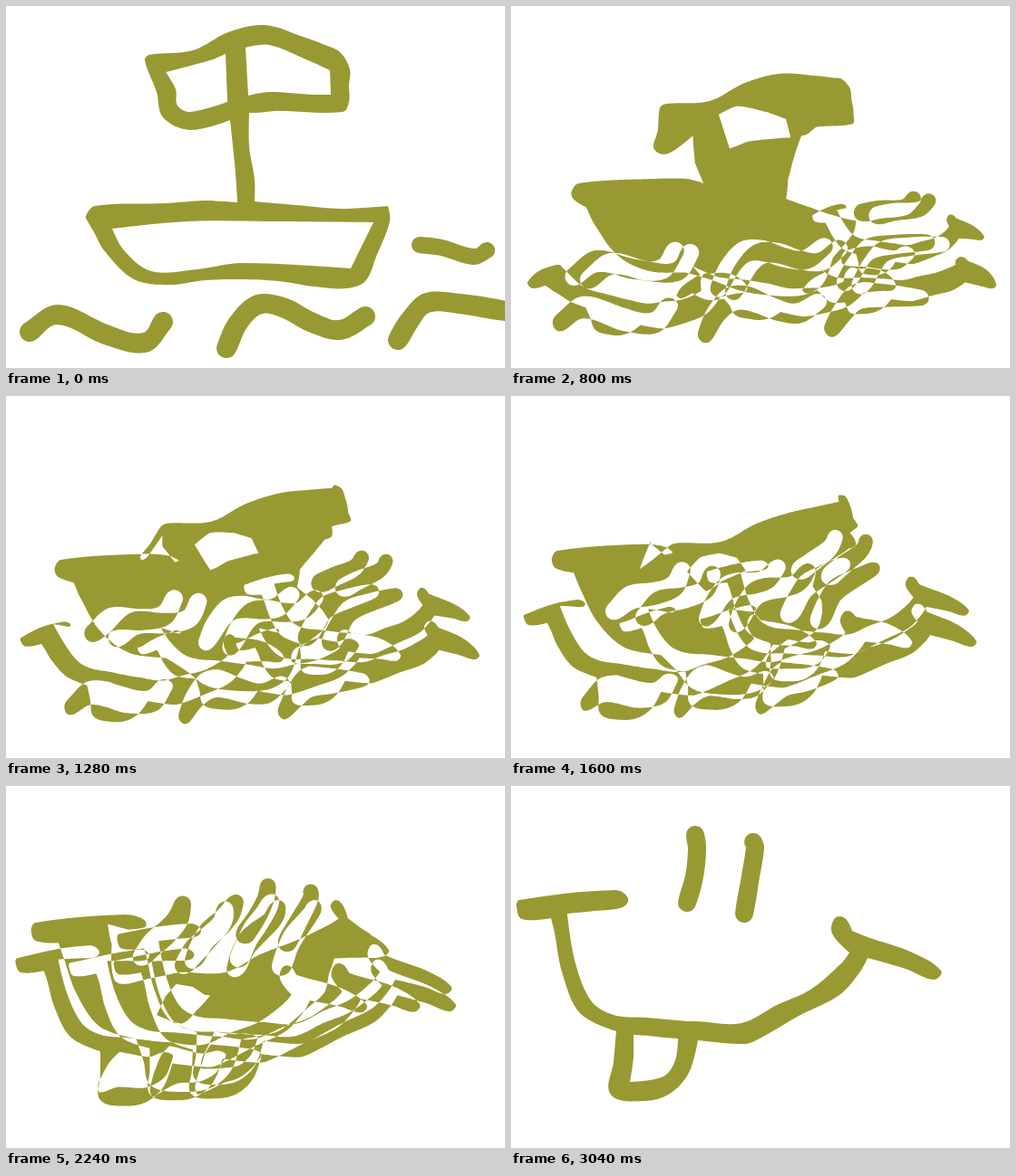
Animation, 550 px wide and 400 px high, one loop 3.2 s. Source, as an HTML page with a canvas:

```html
<!DOCTYPE html>
<html lang="en">
<head>
<meta charset="utf-8">
<title>Boat to smile</title>
<style>
html, body { margin: 0; width: 100%; height: 100%; overflow: hidden; background: #fff; }
canvas { display: block; }
</style>
</head>
<body>
<canvas id="stage" width="550" height="400"></canvas>
<script>
const INK = '#999933', STEP = 160, LAST = 19;

// Key points run clockwise; "!" marks a sharp corner.
// Boat and smile, and sail and tongue, match point by point.
const boat = outline(`88,232 98,221 175,218 218,215 240,216 255,217! 253,185 247,126! 203,137
  173,123 166,95 153,60 158,54 206,49 245,29 285,21 330,35 349,42 368,51 379,70 378,88
  378,106 371,117 300,116 276,118 268,118! 268,155 274,192 274,216! 320,220 370,224 421,221!
  423,238 408,277 396,304 375,312 340,310 300,304 260,302 220,303 180,308 141,302 108,270
  97,250 90,238`);
const smile = outline(`6,133 9,126 115,115 129,124 123,134 92,138 62,141! 70,192 88,237
  113,253 150,256 195,260 205,260 254,262 293,242 330,225 364,196 373,184! 354,163 357,146
  368,146 376,160! 393,167 440,183 474,204 466,214 435,202 393,190! 385,205 362,231 319,253
  266,283 250,285 206,281! 196,317 175,340 147,348 110,341 113,305 116,271! 76,251 56,205
  48,162 44,146! 12,147`);
const sail = outline('264,46! 290,43 335,61 357,71! 358,98! 340,98 290,95 267,99!');
const tongue = outline('131,327! 135,300 135,275! 152,276 169,278 184,279! 181,303 168,321');
const flag = outline('176,73! 225,60 242,53! 244,106! 203,117 189,110 187,92');
const hull = outline(`117,246! 200,238 300,238 405,239! 380,290! 260,284 210,291 160,293
  130,270`);

const waves = [
  stroke(11, '26,360 57,341 110,363 153,372 173,349'),
  stroke(11, '243,378 256,350 278,330 305,333 338,350 368,358 396,343'),
  stroke(11, '432,369 446,346 464,328 500,329 550,337'),
  stroke(9, '456,264 480,267 516,277 530,270')
];
const eyes = [
  stroke(10, '194,129 202,100 205,70 203,54'),
  stroke(10, '257,141 264,100 269,68 267,62')
];

function outline(text) {
  return text.trim().split(/\s+/).map(p => [...p.split(',').map(parseFloat), p.endsWith('!')]);
}

// Outline of a round-ended brush stroke; tip is the index of its far end
function stroke(r, text) {
  const mid = outline(text), n = mid.length;
  const spot = (p, a) => [p[0] + r * Math.cos(a), p[1] + r * Math.sin(a)];
  const angle = (p, q) => Math.atan2(q[1] - p[1], q[0] - p[0]);
  const cap = (p, a) => [-2, -1, 0, 1, 2].map(k => spot(p, a + k * Math.PI / 4));
  const side = turn => mid.slice(1, -1).map((p, i) =>
    spot(p, angle(mid[i], mid[i + 2]) + turn * Math.PI / 2));
  return {
    pts: [...cap(mid[0], angle(mid[1], mid[0])), ...side(-1),
      ...cap(mid[n - 1], angle(mid[n - 2], mid[n - 1])), ...side(1).reverse()],
    tip: n + 6
  };
}

function dist(a, b) { return Math.hypot(b[0] - a[0], b[1] - a[1]); }

// Smooth polyline along a closed outline, from point i up to point j (wrapping)
function curve(pts, i, j) {
  const n = pts.length, at = k => pts[(k + n) % n], out = [at(i)];
  const slope = k => {
    if (at(k)[2]) return [0, 0];
    const a = at(k - 1), b = at(k + 1), d = dist(a, b) || 1;
    return [(b[0] - a[0]) / d, (b[1] - a[1]) / d];
  };
  if (j <= i) j += n;
  for (let k = i; k < j; k++) {
    const p = at(k), q = at(k + 1), u = slope(k), v = slope(k + 1), h = dist(p, q) / 3;
    for (let s = 1; s <= 8; s++) {
      const t = s / 8, r = 1 - t;
      out.push([0, 1].map(c => r * r * r * p[c] + 3 * r * r * t * (p[c] + u[c] * h)
        + 3 * r * t * t * (q[c] - v[c] * h) + t * t * t * q[c]));
    }
  }
  return out;
}

function length(line) {
  return line.reduce((sum, p, i) => i ? sum + dist(line[i - 1], p) : 0, 0);
}

// n points at equal distances, without the end point
function resample(line, n) {
  const gap = length(line) / n, out = [];
  let k = 0, passed = 0;
  for (let i = 0; i < n; i++) {
    let d = dist(line[k], line[k + 1]);
    while (k < line.length - 2 && passed + d < i * gap) {
      passed += d;
      k++;
      d = dist(line[k], line[k + 1]);
    }
    const f = d ? (i * gap - passed) / d : 0, p = line[k], q = line[k + 1];
    out.push([p[0] + (q[0] - p[0]) * f, p[1] + (q[1] - p[1]) * f]);
  }
  return out;
}

// Pairs of matching indices split both outlines into legs
function morph(a, b, pairs = a.map((p, i) => [i, i])) {
  const from = [], to = [];
  pairs.forEach(([i, j], k) => {
    const [ni, nj] = pairs[(k + 1) % pairs.length];
    const la = curve(a, i, ni), lb = curve(b, j, nj);
    const n = Math.ceil(Math.max(length(la), length(lb)) / 2);
    from.push(...resample(la, n));
    to.push(...resample(lb, n));
  });
  return t => from.map((p, i) => [p[0] + (to[i][0] - p[0]) * t, p[1] + (to[i][1] - p[1]) * t]);
}

function rightmost(pts) {
  return pts.reduce((best, p, i) => p[0] > pts[best][0] ? i : best, 0);
}

// Every wave turns into each part of the face
const morphs = [morph(boat, smile), morph(sail, tongue)];
for (const { pts, tip } of waves) {
  for (const part of [smile, tongue]) {
    morphs.push(morph(pts, part, [[1, 0], [tip, rightmost(part)]]));
  }
  for (const eye of eyes) morphs.push(morph(pts, eye.pts, [[1, 3], [tip, eye.tip]]));
}

const whole = pts => curve(pts, 0, 0);
const first = [boat, sail, flag, hull, ...waves.map(w => w.pts)].map(whole);
const last = [smile, tongue, ...eyes.map(e => e.pts)].map(whole);

function shapes(step) {
  if (step === 0) return first;
  if (step === LAST) return last;
  return morphs.map(m => m(step / LAST));
}

const ctx = document.getElementById('stage').getContext('2d');
const start = performance.now();
let shown = -1;

function draw() {
  const step = Math.floor((performance.now() - start) / STEP) % (LAST + 1);
  if (step !== shown) {
    shown = step;
    ctx.fillStyle = '#fff';
    ctx.fillRect(0, 0, 550, 400);
    ctx.beginPath();
    for (const line of shapes(step)) {
      line.forEach(([x, y], i) => i ? ctx.lineTo(x, y) : ctx.moveTo(x, y));
      ctx.closePath();
    }
    ctx.fillStyle = INK;
    ctx.fill('evenodd');
  }
  requestAnimationFrame(draw);
}
draw();
</script>
</body>
</html>
```
